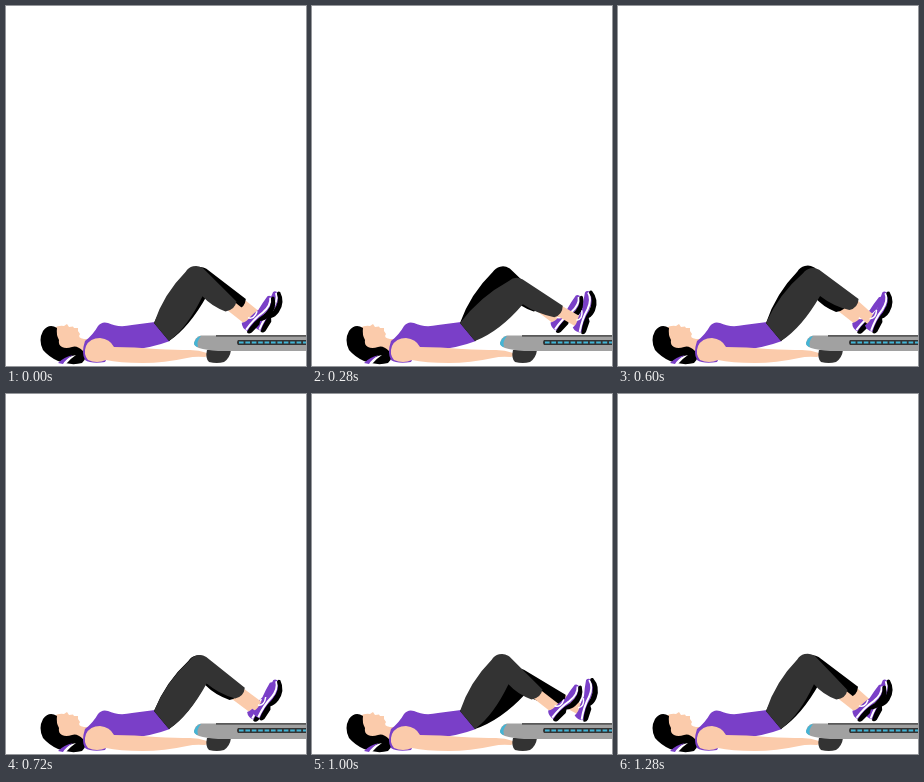
An HTML page with a canvas for the animation above (1320 ms loop, 300 by 360 pixels).

```html
<!DOCTYPE html>
<html lang="en">
<head>
<meta charset="utf-8">
<title>Lying treadmill walk</title>
<style>
html, body { margin: 0; width: 100%; height: 100%; overflow: hidden; background: #fff; }
canvas { display: block; width: 300px; height: 360px; }
</style>
</head>
<body>
<canvas width="300" height="360"></canvas>
<script>
const ctx = document.querySelector('canvas').getContext('2d');
const LOOP = 1320, STEP = 40;
const SKIN = '#fbcbab', PURPLE = '#7a3fc8', BLACK = '#000', DARK = '#333', GREY = '#a1a1a1', CYAN = '#43b5d6';

// time, knee x/y, cuff x/y, heel x/y, sole angle in degrees
const GAIT = [
  [0, 190, 272, 224, 300, 243, 328, -46],
  [170, 199, 277, 237, 302, 264, 329, -65],
  [370, 207, 287, 249, 306, 274, 328, -72],
  [600, 195, 274, 235, 298, 257, 328, -62],
  [670, 194, 273, 234, 298, 257, 327, -58],
  [840, 193, 273, 230, 300, 252, 327, -53],
  [1000, 190, 272, 224, 300, 243, 328, -44],
  [1160, 191, 272, 223, 302, 242, 329, -44]
];

function keyAt(i) {
  const n = GAIT.length, turn = Math.floor(i / n), key = GAIT[i - turn * n];
  return [key[0] + turn * LOOP, ...key.slice(1)];
}

// Periodic Hermite interpolation of the gait keys
function poseAt(time) {
  const t = time % LOOP;
  let i = GAIT.length - 1;
  while (GAIT[i][0] > t) i--;
  const [a, b, c, d] = [-1, 0, 1, 2].map(k => keyAt(i + k));
  const span = c[0] - b[0], s = (t - b[0]) / span;
  return b.slice(1).map((v, j) => {
    const k = j + 1;
    const m0 = (c[k] - a[k]) / (c[0] - a[0]) * span;
    const m1 = (d[k] - b[k]) / (d[0] - b[0]) * span;
    const diff = c[k] - v;
    return v + s * (m0 + s * (3 * diff - 2 * m0 - m1 + s * (m0 + m1 - 2 * diff)));
  });
}

function shape(color, path) {
  ctx.fillStyle = color;
  ctx.fill(new Path2D(path));
}

function line(color, width, path) {
  ctx.strokeStyle = color;
  ctx.lineWidth = width;
  ctx.stroke(new Path2D(path));
}

function shoe(x, y, angle) {
  ctx.save();
  ctx.translate(x, y);
  ctx.rotate(angle);
  shape(PURPLE, 'M1-3Q-1-9 3-13Q7-10 13-11Q19-11 24-10Q32-12 40-13Q43-12 42-8Q37-2 26-3Z');
  line('#fff', 2, 'M1-5Q14-7 25-5Q36-4 41-10');
  line('#fff', 1.5, 'M11-12Q14-6 22-10');
  shape(BLACK, 'M0-3Q12-6 24-3Q36-2 41-9Q44-10 44-7Q38 3 26 2.5Q20 2 17-1L14 1L3 1Q-1 0 0-3Z');
  ctx.restore();
}

function leg(time, color) {
  const [kx, ky, cx, cy, hx, hy, degrees] = poseAt(time);
  const angle = degrees * Math.PI / 180, cos = Math.cos(angle), sin = Math.sin(angle);
  const ankleX = hx + 10 * cos + 8 * sin, ankleY = hy + 10 * sin - 8 * cos;
  line(SKIN, 11, `M${cx - 3} ${cy - 3}L${ankleX} ${ankleY}`);
  shoe(hx, hy, angle);

  const thigh = Math.atan2(ky - 327, kx - 157) - Math.PI / 2;
  const shin = Math.atan2(cy - ky, cx - kx) - Math.PI / 2;
  const mx = Math.cos(thigh), my = Math.sin(thigh), nx = Math.cos(shin), ny = Math.sin(shin);
  const inner = 10 / (1 + Math.cos(shin - thigh));
  const ix = kx - (mx + nx) * inner - 5 * ny, iy = ky - (my + ny) * inner + 5 * nx;
  ctx.fillStyle = color;
  ctx.beginPath();
  ctx.moveTo(148, 317);
  ctx.quadraticCurveTo((148 + kx) / 2 + mx * 13, (317 + ky) / 2 + my * 13, kx + mx * 12, ky + my * 12);
  ctx.arc(kx, ky, 12, thigh, shin);
  ctx.lineTo(cx + nx * 7 + 2, cy + ny * 7 + 1);
  ctx.quadraticCurveTo(cx + 5, cy + 4, cx - nx * 7, cy - ny * 7);
  ctx.quadraticCurveTo((cx + ix) / 2 - nx * 7, (cy + iy) / 2 - ny * 7, ix, iy);
  ctx.quadraticCurveTo(ix * .45 + 93, iy * .45 + 191, 163, 335);
  ctx.fill();
}

function treadmill() {
  shape(DARK, 'M201 344H225Q224 352 218 356Q211 358 203 356Q199 352 201 344Z');
  shape(GREY, 'M195 329.5H300V345H212Q200 344 193 342Q188 340 188 337Q189 331 195 329.5Z');
  shape(CYAN, 'M195 330Q190 331 188 337Q188 340 192 341Q190 336 195 330Z');
  line(DARK, 1.3, 'M210 329.8H300');
  shape(DARK, 'M232 334H300V339H232Q230 336.5 232 334Z');
  ctx.setLineDash([4.6, 1.8]);
  line(CYAN, 1.8, 'M233 336.5H300');
  ctx.setLineDash([]);
}

function head() {
  shape(SKIN, 'M48 322Q53 319 58 320L61 318L63 321L67 320.5L68 322L72 322L72 325L74 328Q71 332 78 333L88 333L84 348L68 345L52 342Z');
  shape(BLACK, 'M51 322Q43 317 37 325Q32 334 37 344Q43 351 52 355Q65 360 76 357Q82 352 77 345Q71 339 66 341Q60 343 56 341Q52 339 53 334Q50 329 51 322Z');
  shape('#fff', 'M55 357Q62 350 70 349Q64 353 60 358Z');
  shape(PURPLE, 'M52 357Q58 351 67 349Q60 353 57 358Z');
}

function torso() {
  shape(PURPLE, 'M79 335Q87 329 92 320Q96 315 102 317Q112 322 126 319L149 316L164 335Q145 342 128 343L104 346L99 356Q85 358 79 354Q75 347 79 335Z');
  shape(SKIN, 'M80 340Q84 332 94 332Q104 333 108 341Q128 341 150 343Q170 344 184 344Q193 344 201 347L203 349L199 351Q189 350 181 352Q158 357 137 357Q113 357 100 354Q91 358 82 354Q77 348 80 340Z');
}

function frame(now) {
  const time = Math.floor(now % LOOP / STEP) * STEP;
  ctx.fillStyle = '#fff';
  ctx.fillRect(0, 0, 300, 360);
  head();
  torso();
  treadmill();
  leg(time + LOOP / 2, BLACK);
  leg(time, DARK);
  requestAnimationFrame(tick);
}

const start = performance.now();
const tick = now => frame(Math.max(0, now - start));
requestAnimationFrame(tick);
</script>
</body>
</html>
```
